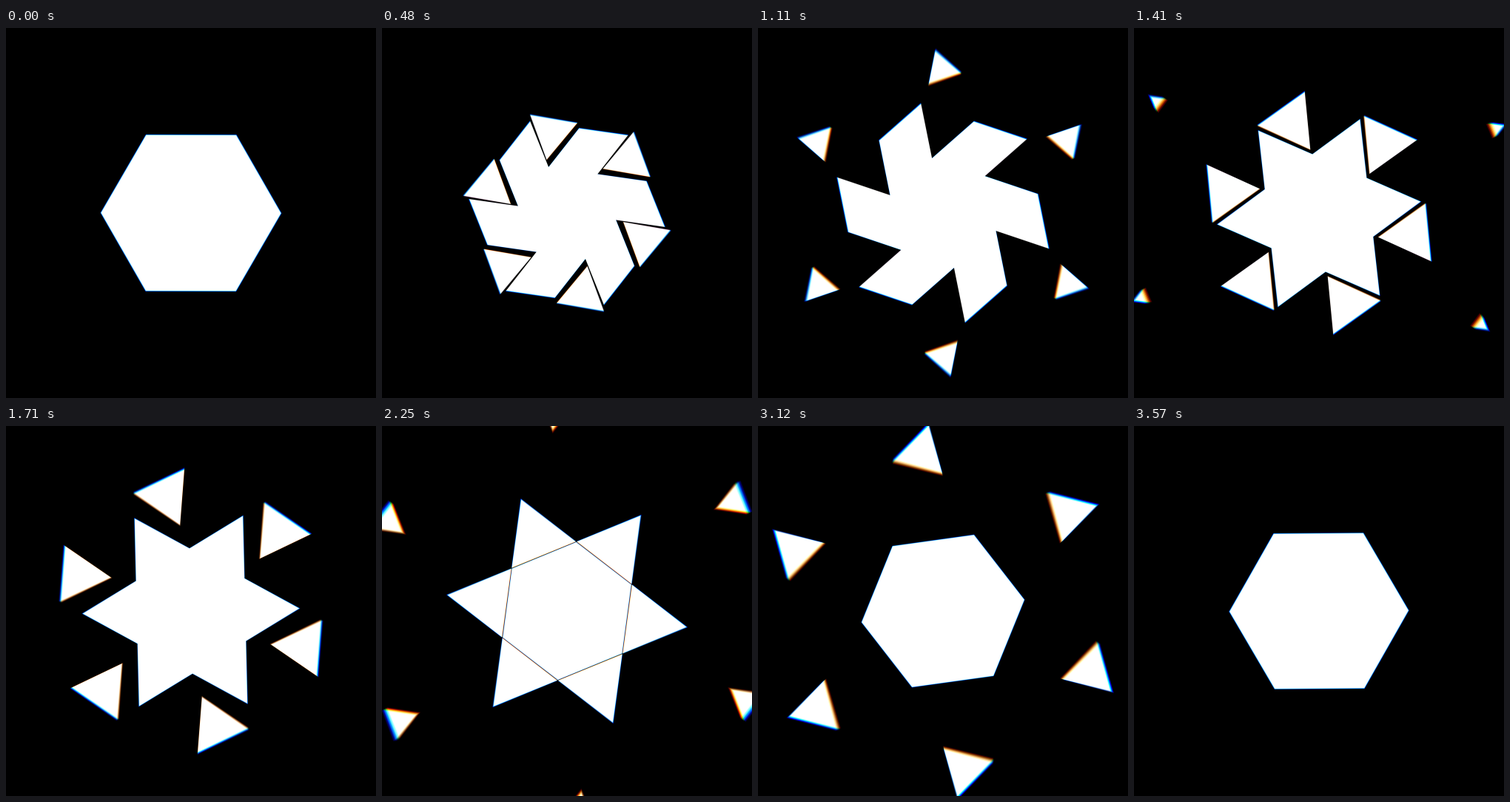
Recreate the animation shown at these times as an HTML page with a canvas. Size 500x500 px, loop 3600 ms.

```html
<!DOCTYPE html>
<html lang="en">
<head>
<meta charset="utf-8">
<title>Hexagon breakup</title>
<style>
  html, body { margin: 0; width: 100%; height: 100%; overflow: hidden; background: #000; }
  canvas { display: block; width: 500px; height: 500px; }
</style>
</head>
<body>
<canvas id="stage" width="500" height="500"></canvas>
<script>
const ctx = document.getElementById('stage').getContext('2d');

const LOOP = 3600, STEP = 30;
const UNIT = 60.9;            // small triangle side at the start; doubles every loop
const FLIGHT = 0.4;           // share of the loop a loose triangle flies
const SHUTTER = 0.6, SAMPLES = 5;
const SPREAD = 0.000034;      // radial colour fringe, grows with the square of the radius
const CHANNELS = [['rgb(51,0,0)', -1], ['rgb(0,51,0)', 0], ['rgb(0,0,51)', 1]];

// Points are [a, b] on a triangular lattice with axes 60 degrees apart.
const OUTLINES = [
  [[2, 0]],
  [[1, 0], [1, 1], [0, 2]],
  [[1, 0], [1, 1]],
  [[1, 0]]
];
const PIECES = [
  { start: 0.04, points: [[1, 0], [2, 0], [1, 1]] },
  { start: 0.32, points: [[0, 1], [1, 1], [0, 2]] },
  { start: 0.60, points: [[1, 0], [0, 1], [1, 1]] }
];

const toXY = ([a, b]) => [a + b / 2, b * Math.sqrt(3) / 2];

function turn([x, y], angle, scale = 1) {
  const c = Math.cos(angle) * scale, s = Math.sin(angle) * scale;
  return [x * c - y * s, x * s + y * c];
}

// A loose triangle moves outward while it shrinks and spins about its centre.
function fly(points, p) {
  const pts = points.map(toXY);
  const cx = (pts[0][0] + pts[1][0] + pts[2][0]) / 3;
  const cy = (pts[0][1] + pts[1][1] + pts[2][1]) / 3;
  const out = 1 + 1.5 * p * p;
  const fade = p ** 2.5;
  return pts.map(([x, y]) => {
    const [dx, dy] = turn([x - cx, y - cy], fade * Math.PI / 3, 1 - fade);
    return [cx * out + dx, cy * out + dy];
  });
}

function shapesAt(t) {
  const unit = UNIT * 2 ** t;
  const spin = i => (t + i) * Math.PI / 3;
  const sixfold = pts => [0, 1, 2, 3, 4, 5].map(i => pts.map(p => turn(p, spin(i), unit)));
  const stage = PIECES.filter(piece => t > piece.start).length;
  const shapes = [sixfold(OUTLINES[stage].map(toXY)).flat()];
  for (const { start, points } of PIECES) {
    const p = (t - start) / FLIGHT;
    if (p > 0 && p < 1) shapes.push(...sixfold(fly(points, p)));
  }
  return shapes;
}

function fillShapes(shapes, shift) {
  ctx.beginPath();
  for (const shape of shapes) {
    shape.forEach(([x, y], i) => {
      const k = 1 + shift * SPREAD * Math.hypot(x, y);
      ctx[i ? 'lineTo' : 'moveTo'](250 + x * k, 250 + y * k);
    });
    ctx.closePath();
  }
  ctx.fill();
}

function draw(time) {
  ctx.globalCompositeOperation = 'source-over';
  ctx.fillStyle = '#000';
  ctx.fillRect(0, 0, 500, 500);
  ctx.globalCompositeOperation = 'lighter';
  for (let s = 0; s < SAMPLES; s++) {
    const t = (time + STEP * SHUTTER * s / SAMPLES) / LOOP % 1;
    const shapes = shapesAt(t);
    for (const [colour, shift] of CHANNELS) {
      ctx.fillStyle = colour;
      fillShapes(shapes, shift);
    }
  }
}

const began = performance.now();
let shown = -1;

function tick(now) {
  const step = Math.floor((Math.max(0, now - began) + 1) / STEP) % (LOOP / STEP);
  if (step !== shown) {
    shown = step;
    draw(step * STEP);
  }
  requestAnimationFrame(tick);
}

tick(began);
</script>
</body>
</html>
```
